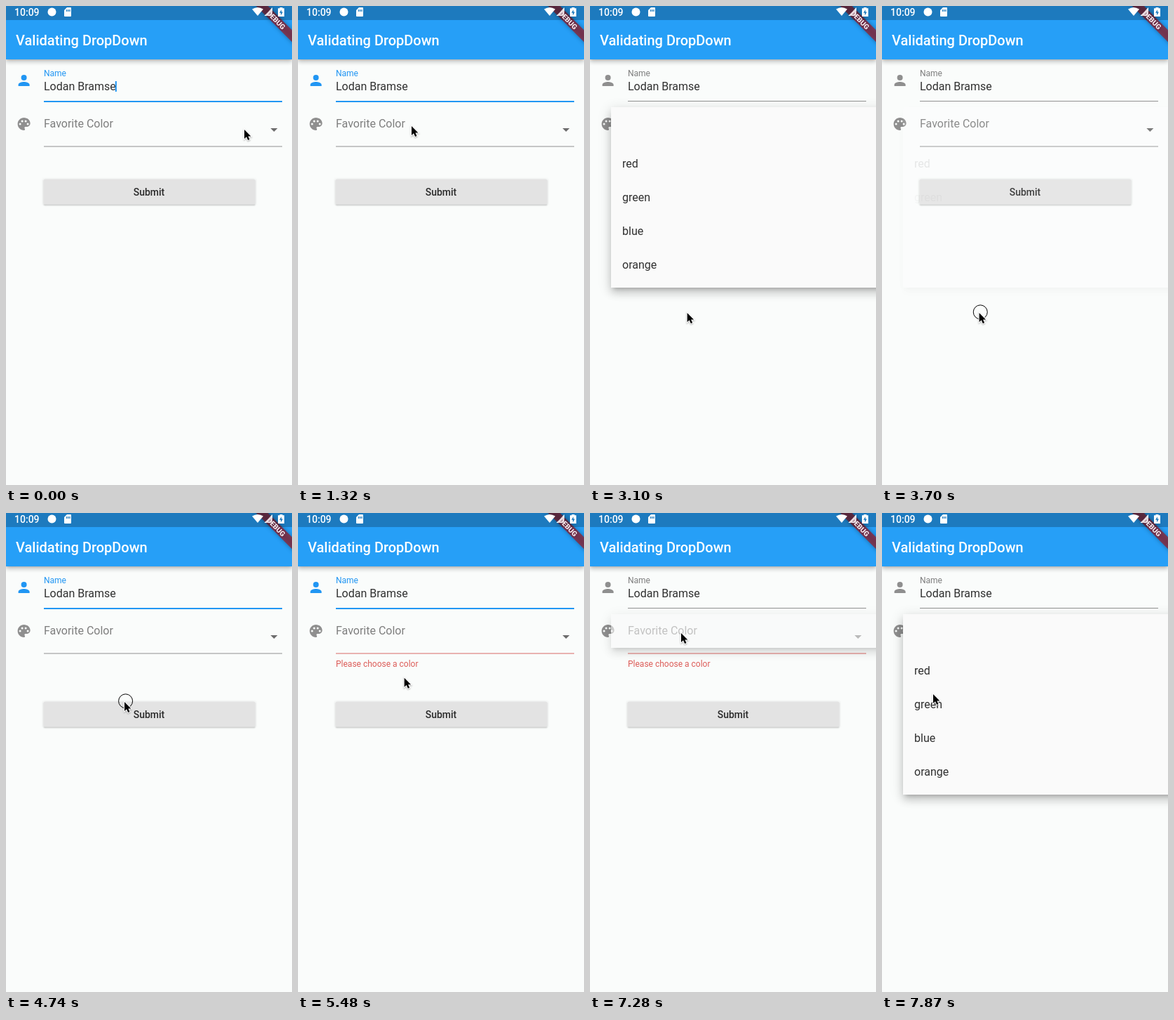
These frames come from a looping animation (408x682 px, 8 s). An HTML page with a canvas:

```html
<!DOCTYPE html>
<html lang="en">
<head>
<meta charset="utf-8">
<title>Validating DropDown</title>
<style>
html, body { margin: 0; width: 100%; height: 100%; overflow: hidden; background: #fafcfb; }
canvas { display: block; }
</style>
</head>
<body>
<canvas id="stage" width="408" height="682"></canvas>
<script>
const ctx = document.getElementById('stage').getContext('2d');
const W = 408, H = 682, LOOP = 8000;
const STEP = 148.5, LEAD = 20;
const BLUE = '#2196f3', GREY = '#8f8f8f', LINE = '#929292', INK = '#303030', HINT = '#7e7e7e';
const USER = 'Lodan Bramse';
const COLORS = ['red', 'green', 'blue', 'orange'];

// Events of the session, in ms
const OPENS = [1885, 7235], CLOSE = 3645, SUBMIT = 4740;
const TAPS = [1770, 3700, SUBMIT, 7120];
const HOME = { x: 340, y: 176 };
const MOVES = [
  { from: 590, to: 1320, x: 162, y: 171 },
  { from: 1480, to: 1780, x: 149, y: 172 },
  { from: 2670, to: 3110, x: 138.7, y: 437 },
  { from: 3870, to: 4440, x: 169, y: 269 },
  { from: 5190, to: 5930, x: 122, y: 176 },
  { from: 6540, to: 6975, x: 130, y: 171 },
  { from: 7580, to: 7870, x: 73, y: 258 }
];

const PERSON = new Path2D('M12 4a4 4 0 1 0 0 8a4 4 0 1 0 0-8z' +
  'M12 14c-2.67 0-8 1.34-8 4v2h16v-2c0-2.66-5.33-4-8-4z');
const PALETTE = new Path2D('M12 3c-4.97 0-9 4.03-9 9s4.03 9 9 9c.83 0 1.5-.67 1.5-1.5 ' +
  '0-.39-.15-.74-.39-1.01-.23-.26-.38-.61-.38-.99 0-.83.67-1.5 1.5-1.5H16' +
  'c2.76 0 5-2.24 5-5 0-4.42-4.03-8-9-8z');
for (const [x, y] of [[6.5, 12], [9.5, 8], [14.5, 8], [17.5, 12]]) {
  PALETTE.moveTo(x + 1.5, y);
  PALETTE.arc(x, y, 1.5, 0, Math.PI * 2);
}
const CHEVRON = new Path2D('M7 10h10l-5 5z');
const ARROW = new Path2D('M0 0V13L3 10.3L5.2 15L7.5 14L5.4 9.5H9.4Z');
const WIFI = new Path2D('M351 4.5Q359 -0.5 367 4.5L359 14Z');
const SIGNAL = new Path2D('M380 2V14H368.5Z');
const CARD = new Path2D('M87 2H92Q93 2 93 3V14Q93 15 92 15H84Q83 15 83 14V6Z' +
  'M86 5V8H87.2V5ZM88.2 5V8H89.4V5ZM90.4 5V8H91.6V5Z');
const BATTERY = new Path2D('M390.5 2H394.5V3.3H397V15H388V3.3H390.5Z' +
  'M393 5.2L390 9.8H392V13.2L395 8.6H393Z');

const clamp = v => Math.min(1, Math.max(0, v));
const span = (v, a, b) => clamp((v - a) / (b - a));
const ease = p => p * p * (3 - 2 * p);
const mix = (a, b, p) => a + (b - a) * p;

function rect(x, y, w, h, color) {
  ctx.fillStyle = color;
  ctx.fillRect(x, y, w, h);
}

function text(str, x, y, size, color, weight = 400, align = 'left') {
  ctx.font = `${weight} ${size}px Roboto, sans-serif`;
  ctx.textAlign = align;
  ctx.fillStyle = color;
  ctx.fillText(str, x, y);
}

function icon(path, x, y, color) {
  ctx.save();
  ctx.translate(x, y);
  ctx.fillStyle = color;
  ctx.fill(path, 'evenodd');
  ctx.restore();
}

function circle(x, y, r) {
  ctx.beginPath();
  ctx.arc(x, y, r, 0, Math.PI * 2);
}

// One shadow layer, cast by a copy far off stage and kept outside the panel.
function shadow(x, y, w, h, dy, blur, spread, alpha) {
  const far = 3000;
  ctx.save();
  ctx.beginPath();
  ctx.rect(0, 0, W, H);
  ctx.rect(x, y, w, h);
  ctx.clip('evenodd');
  ctx.shadowColor = `rgba(0,0,0,${alpha * ctx.globalAlpha})`;
  ctx.globalAlpha = 1;
  ctx.shadowBlur = blur;
  ctx.shadowOffsetX = far;
  ctx.shadowOffsetY = dy;
  rect(x - spread - far, y - spread, w + 2 * spread, h + 2 * spread, '#000');
  ctx.restore();
}

// Raised surface with umbra, penumbra and ambient shadows scaled by elevation.
function panel(x, y, w, h, radius, color, e) {
  shadow(x, y, w, h, 0.6 * e, 0.7 * e, -0.35 * e, 0.2);
  shadow(x, y, w, h, e, 1.4 * e, 0, 0.14);
  shadow(x, y, w, h, 0.4 * e, 2.1 * e, 0.2 * e, 0.12);
  ctx.beginPath();
  ctx.roundRect(x, y, w, h, radius);
  ctx.fillStyle = color;
  ctx.fill();
}

function onBanner(paint) {
  ctx.save();
  ctx.translate(409.4, -4);
  ctx.rotate(Math.PI / 4);
  paint();
  ctx.restore();
}

function drawHeader() {
  rect(0, 0, W, 76, '#269ff7');
  panel(0, 0, W, 76, 0, '#269ff7', 4);
  text('Validating DropDown', 14, 56, 20, '#fff', 500);
  onBanner(() => {
    ctx.shadowColor = 'rgba(0,0,0,0.5)';
    ctx.shadowBlur = 6;
    rect(-60, 28, 120, 12, 'rgba(160,20,30,0.66)');
  });
  rect(0, 0, W, 20, 'rgba(0,0,0,0.23)');
  text('10:09', 12, 14, 14, '#fff', 500);
  ctx.fillStyle = '#fff';
  circle(65.5, 8.5, 6);
  ctx.fill();
  for (const p of [CARD, WIFI, SIGNAL, BATTERY]) ctx.fill(p, 'evenodd');
  onBanner(() => {
    ctx.shadowColor = 'rgba(90,20,50,0.9)';
    ctx.shadowBlur = 3;
    text('DEBUG', 0, 37.7, 10.2, '#f4e8ec', 900, 'center');
  });
}

// Menu progress: 300 ms in, and the same backwards when dismissed.
function menuState(t) {
  const open = OPENS.findLast(o => t >= o);
  if (open === undefined) return { alpha: 0 };
  const closing = open < CLOSE && t >= CLOSE;
  const v = closing ? 1 - span(t, CLOSE, CLOSE + 300) : span(t, open, open + 300);
  return {
    v,
    alpha: closing ? span(v, 0.75, 1) : span(v, 0, 0.25),
    height: closing ? 257 : mix(48, 257, ease(span(v, 0.25, 0.5)))
  };
}

function drawName(t, focused) {
  icon(PERSON, 13.6, 94, focused ? BLUE : GREY);
  text('Name', 54, 100, 12, focused ? BLUE : HINT);
  text(USER, 54, 119.5, 16, INK);
  const blinkStart = t < CLOSE ? -270 : 3930;
  if (focused && (t - blinkStart) % 1000 < 500) {
    rect(54 + ctx.measureText(USER).width - 1, 107, 2, 15, BLUE);
  }
  if (focused) rect(54, 135, 340, 2, BLUE);
  else rect(54, 135, 340, 1, LINE);
}

function drawColor(t) {
  const error = span(t, SUBMIT + 20, SUBMIT + 187);
  icon(PALETTE, 13.6, 156, GREY);
  text('Favorite Color', 54, 173, 16, HINT);
  icon(CHEVRON, 370.4, 164, '#6c6c6c');
  rect(54, 199.5, 340, 1, error ? '#da6a67' : LINE);
  ctx.globalAlpha = error;
  text('Please choose a color', 54, 219, 12, '#dc5c58');
  ctx.globalAlpha = 1;
}

function drawButton(t) {
  const top = t >= SUBMIT ? 268.5 : 246.5;
  panel(53.5, top, 302, 36, 2, '#e3e3e3', 1.5);
  text('Submit', 204, top + 23, 14, '#2a2a2a', 500, 'center');
}

function drawMenu({ v, alpha, height }) {
  if (!alpha) return;
  const unit = 0.5 / 6.5;
  ctx.save();
  ctx.globalAlpha = alpha;
  panel(30, 144, 400, height, 2, '#fafafa', 8);
  COLORS.forEach((name, i) => {
    const start = 0.5 + (i + 2) * unit;
    ctx.globalAlpha = alpha * span(v, start, start + 1.5 * unit);
    text(name, 46, 229.5 + i * 48, 16, INK);
  });
  ctx.restore();
}

function drawPointer(t) {
  let { x, y } = HOME;
  for (const m of MOVES) {
    const p = ease(span(t, m.from, m.to));
    x = mix(x, m.x, p);
    y = mix(y, m.y, p);
  }
  if (TAPS.some(tap => t >= tap && t < tap + STEP * 0.95)) {
    circle(x + 1.6, y - 1.2, 10);
    ctx.strokeStyle = '#000';
    ctx.lineWidth = 1;
    ctx.stroke();
  }
  ctx.save();
  ctx.translate(x, y);
  ctx.strokeStyle = '#fff';
  ctx.lineWidth = 2;
  ctx.shadowColor = 'rgba(0,0,0,0.3)';
  ctx.shadowBlur = 2;
  ctx.shadowOffsetY = 1;
  ctx.stroke(ARROW);
  ctx.shadowColor = 'transparent';
  ctx.fillStyle = '#000';
  ctx.fill(ARROW);
  ctx.restore();
}

function draw(time) {
  const t = Math.floor((time + LEAD) / STEP) * STEP;
  const menu = menuState(t);
  rect(0, 0, W, H, '#fafcfb');
  drawName(t, !menu.alpha);
  drawColor(t);
  drawButton(t);
  drawHeader();
  drawMenu(menu);
  drawPointer(t);
}

const start = performance.now();
function tick() {
  draw((performance.now() - start) % LOOP);
  requestAnimationFrame(tick);
}
tick();
</script>
</body>
</html>
```
